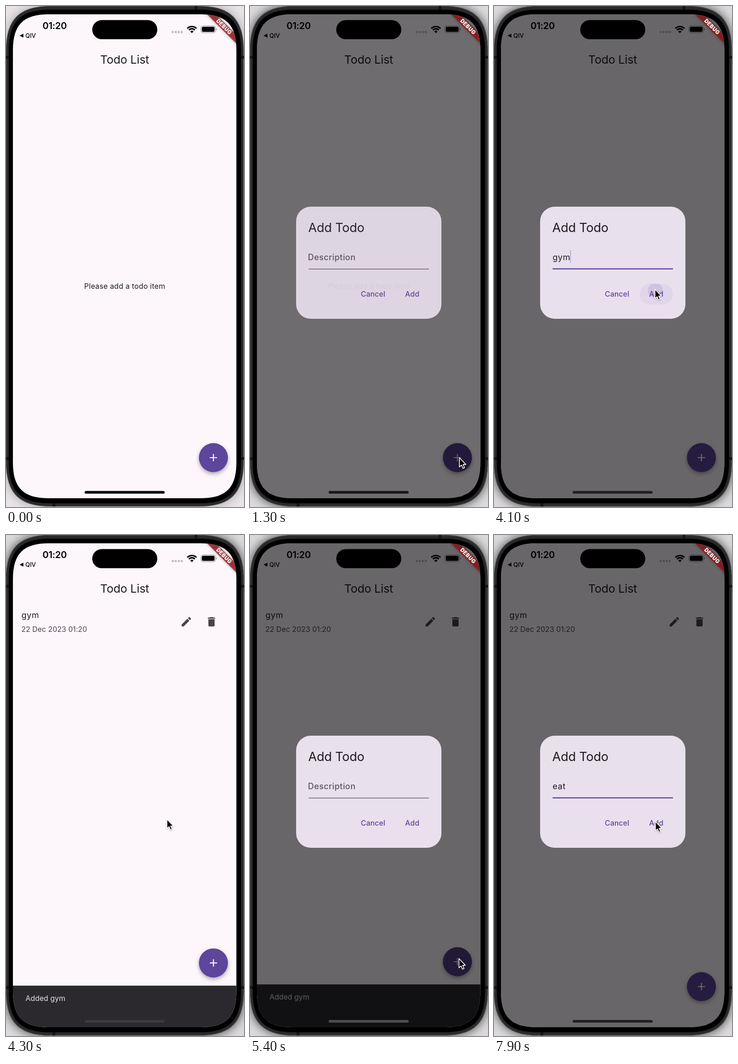
These frames come from a looping animation (516x1086 px, 8000 ms). An HTML page:

```html
<!DOCTYPE html>
<html lang="en">
<head>
<meta charset="utf-8">
<title>Todo List</title>
<style>
@property --drop { syntax: '<length>'; inherits: true; initial-value: 92px; }

html, body { margin: 0; width: 100%; height: 100%; overflow: hidden; background: #dcdadd; }
svg { display: block; width: 516px; height: 1086px; font-family: Inter, Roboto, sans-serif; }
text { white-space: pre; }

.title { font-size: 24.8px; letter-spacing: -.12px; fill: #1d1b20; }
.head { font-size: 27px; letter-spacing: -.22px; fill: #1d1b20; }
.large { font-size: 18px; letter-spacing: .56px; fill: #1d1b20; }
.medium { font-size: 15.76px; letter-spacing: .28px; fill: #1d1b20; }
.label { font-size: 15.76px; font-weight: 500; letter-spacing: .15px; fill: #5b4499; }
.tight { letter-spacing: .06px; }
.muted { fill: #49454f; }
.pale { fill: #e8e2ea; }
.mid { text-anchor: middle; }

/* one shared 8 s clock */
.a { animation: 8s linear infinite; }
.step { animation-timing-function: step-end; }

.desk { animation-name: desk; }
@keyframes desk { 0% { fill: #e8e4e8 } 12.5% { fill: #dcdadd } }
.shade { animation-name: shade; filter: drop-shadow(0 0 11px rgba(0, 0, 0, .75)); }
@keyframes shade { 0% { opacity: .4 } 12.5% { opacity: 1 } }

.empty { animation-name: empty; }
@keyframes empty { 0% { opacity: 1 } 51.75% { opacity: 0 } }
.item { animation-name: item; }
@keyframes item { 0% { opacity: 0 } 51.75% { opacity: 1 } }

.app { animation-name: drop; animation-timing-function: cubic-bezier(.4, 0, .2, 1); }
@keyframes drop {
  0%, 51.5% { --drop: 93px }
  54.375%, 68.75% { --drop: 0px }
  71.875%, 100% { --drop: 93px }
}
.snack { transform: translateY(var(--drop)); }
.fab { transform: translateY(min(0px, calc(var(--drop) - 54px))); }
.disc { filter: drop-shadow(0 4px 4px rgba(0, 0, 0, .32)); }

.press { animation-name: press; }
@keyframes press {
  0%, 11.9% { opacity: 0 } 13.75%, 18.75% { opacity: .13 } 22.5%, 61.9% { opacity: 0 }
  63.75%, 68.75% { opacity: .13 } 72.5%, 100% { opacity: 0 }
}

.modal { animation-name: modal; animation-timing-function: ease; }
.sheet { animation-timing-function: ease-out; }
@keyframes modal {
  0%, 14.375% { opacity: 0 } 16.875%, 51.625% { opacity: 1 }
  53.375%, 64.375% { opacity: 0 } 66.875%, 100% { opacity: 1 }
}

.hint { animation-name: hint; }
@keyframes hint { 0% { opacity: 1 } 37.5% { opacity: 0 } 53.75% { opacity: 1 } 83.75% { opacity: 0 } }
.focus { animation-name: focus; }
@keyframes focus {
  0%, 33.75% { opacity: 0 } 35%, 53.5% { opacity: 1 } 53.75%, 80% { opacity: 0 } 81.25%, 100% { opacity: 1 }
}

.k1 { animation-name: k1 } .k2 { animation-name: k2 } .k3 { animation-name: k3 }
.k4 { animation-name: k4 } .k5 { animation-name: k5 } .k6 { animation-name: k6 }
@keyframes k1 { 0% { fill-opacity: 0 } 37.5% { fill-opacity: 1 } 53.75% { fill-opacity: 0 } }
@keyframes k2 { 0% { fill-opacity: 0 } 40% { fill-opacity: 1 } 53.75% { fill-opacity: 0 } }
@keyframes k3 { 0% { fill-opacity: 0 } 41.25% { fill-opacity: 1 } 53.75% { fill-opacity: 0 } }
@keyframes k4 { 0% { fill-opacity: 0 } 83.75% { fill-opacity: 1 } }
@keyframes k5 { 0% { fill-opacity: 0 } 88.75% { fill-opacity: 1 } }
@keyframes k6 { 0% { fill-opacity: 0 } 90% { fill-opacity: 1 } }

.caret { animation-name: caret; }
@keyframes caret {
  0% { transform: none }
  37.5% { transform: translateX(11px) }
  40% { transform: translateX(21px) }
  41.25% { transform: translateX(38px) }
  53.75% { transform: none }
  83.75% { transform: translateX(10.8px) }
  88.75% { transform: translateX(21.4px) }
  90% { transform: translateX(29px) }
}
.blink { animation-name: blink; }
@keyframes blink {
  0%, 33.7% { opacity: 0 } 33.75%, 48.125% { opacity: 1 } 51.25% { opacity: .3 }
  53.5%, 79.95% { opacity: 0 } 80%, 95.625% { opacity: 1 } 98.125%, 100% { opacity: 0 }
}

.pill { animation-name: pill; }
@keyframes pill { 0%, 50.7% { opacity: 0 } 51.2%, 53.4% { opacity: 1 } 53.75%, 100% { opacity: 0 } }
.splash { animation-name: splash; }
@keyframes splash { 0%, 50.6% { r: 8px } 51.25% { r: 16px } 53.4%, 100% { r: 50px } }

.home { animation-name: home; }
@keyframes home {
  0%, 14.375% { fill: #000 } 16.875%, 51.625% { fill: #222023 }
  54%, 64.375% { fill: #403e43 } 66.875%, 69% { fill: #4e4c50 } 71.875%, 100% { fill: #222023 }
}

.show { animation-name: show; }
@keyframes show { 0% { opacity: 0 } 1.25% { opacity: 1 } }
.cursor {
  animation-name: move; animation-timing-function: ease-in-out;
  filter: drop-shadow(0 1.5px 1.2px rgba(0, 0, 0, .35));
}
@keyframes move {
  0%, 1.25% { transform: translate(117px, 640px) }
  6.25% { transform: translate(490px, 996px) }
  8.75%, 23.1% { transform: translate(454px, 979px) }
  30%, 43.1% { transform: translate(264px, 530px) }
  46.25% { transform: translate(346px, 648px) }
  48.75%, 51.25% { transform: translate(349px, 614px) }
  53.75%, 55% { transform: translate(349px, 616px) }
  58.75% { transform: translate(494px, 936px) }
  61.25%, 73.1% { transform: translate(453px, 918px) }
  77.5%, 90.6% { transform: translate(264px, 525px) }
  95.6% { transform: translate(372px, 686px) }
  98.75%, 100% { transform: translate(350px, 621px) }
}
</style>
</head>
<body>
<svg viewBox="0 0 516 1086">
  <defs>
    <clipPath id="screen"><path data-box="15 18 484.5 1049 62"/></clipPath>
    <clipPath id="button"><rect x="316" y="602" width="72" height="45" rx="22.5"/></clipPath>
  </defs>

  <!-- phone body -->
  <rect class="a step desk" width="516" height="1086"/>
  <path class="a step shade" data-box="0 0 515.5 1085 78"/>
  <path data-box="0 0 515.5 1085 78" fill="#454445"/>
  <path data-box="1.5 1.5 512.5 1082 76.5" fill="#2a292a"/>
  <path d="M409 0h6v8h-6zM101 1077h6v8h-6zM0 108h7v6H0zM0 978h7v6H0zM509 108h7v6h-7zM509 978h7v6h-7z" fill="#171617"/>
  <path data-box="6 8 503.5 1070 71"/>

  <g clip-path="url(#screen)">
    <g class="a app">
      <rect x="14" y="18" width="487" height="1050" fill="#fdf7fc"/>
      <text class="title mid" x="257.3" y="125.3">Todo List</text>
      <text class="a step empty medium mid" x="257.4" y="613">Please add a todo item</text>

      <g class="a step item">
        <text class="large" x="33.5" y="180">gym</text>
        <text class="medium muted tight" x="33.3" y="209.5">22 Dec 2023 01:20</text>
        <g fill="#47434a">
          <path transform="translate(377.5 174.5) scale(1.1256)" d="M3 17.25V21h3.75L17.81 9.94l-3.75-3.75L3 17.25zM20.71 7.04c.39-.39.39-1.02 0-1.41l-2.34-2.34c-.39-.39-1.02-.39-1.41 0l-1.83 1.83 3.75 3.75 1.83-1.83z"/>
          <path transform="translate(432 174.5) scale(1.1256)" d="M6 19c0 1.1.9 2 2 2h8c1.1 0 2-.9 2-2V7H6v12zM19 4h-3.5l-1-1h-5l-1 1H5v2h14V4z"/>
        </g>
      </g>

      <g class="snack">
        <rect x="14" y="974.2" width="487" height="94" fill="#2b292d"/>
        <text class="medium tight pale" x="42.3" y="1007">Added gym</text>
      </g>

      <g class="fab">
        <circle class="disc" cx="449.7" cy="979" r="31.5" fill="#5d469b"/>
        <path d="M441.8 979h15.8M449.7 971.1v15.8" stroke="#fff" stroke-width="2.2"/>
        <circle class="a press" cx="449.7" cy="979" r="31.5"/>
      </g>
    </g>

    <g class="a modal">
      <rect x="14" y="18" width="487" height="1050" fill-opacity=".587"/>
    </g>

    <g class="a modal sheet">
      <rect x="100" y="435" width="315" height="243" rx="31.5" fill="#e9e0ee"/>
      <text class="head" x="126.3" y="489.5">Add Todo</text>
      <text class="a step hint large" x="125.5" y="551.3" style="font-weight:500;letter-spacing:.42px;fill:#5a5560">Description</text>
      <text class="large" x="127" y="551.3"><tspan class="a step k1">g</tspan><tspan class="a step k2">y</tspan><tspan class="a step k3">m</tspan></text>
      <text class="large" x="127" y="551.3"><tspan class="a step k4">e</tspan><tspan class="a step k5">a</tspan><tspan class="a step k6">t</tspan></text>
      <g class="a step caret"><rect class="a blink" x="126.8" y="529" width="2.2" height="28.5" rx="1" fill="#5b4499"/></g>
      <rect x="127" y="569.6" width="261" height="1.2" fill="#49454f"/>
      <rect class="a focus" x="127" y="568.6" width="261" height="2.4" fill="#5b4499"/>

      <g class="a pill" clip-path="url(#button)">
        <rect x="316" y="602" width="72" height="45" fill="#e0d6ec"/>
        <circle class="a splash" cx="349.5" cy="617" r="16" fill="#cfc4df"/>
      </g>
      <text class="label mid" x="266.8" y="629.8">Cancel</text>
      <text class="label mid" x="351.8" y="629.8">Add</text>
    </g>

    <!-- debug ribbon -->
    <g transform="translate(472.4 45) rotate(45)">
      <rect x="-70" y="-6.75" width="140" height="13.5" fill="#911418" fill-opacity=".79" style="filter:drop-shadow(0 0 3px rgba(0,0,0,.4))"/>
      <text class="mid" x=".2" y="4.1" fill="#fff" font-size="11.4" font-weight="900" letter-spacing=".5">DEBUG</text>
    </g>
  </g>

  <!-- status bar -->
  <text class="mid" x="105.5" y="49.9" font-size="20" font-weight="600" letter-spacing="-.2">01:20</text>
  <path d="M29.5 64.3l8.2-4.2v8.4z"/>
  <text x="42" y="68.9" font-size="13" font-weight="500">QIV</text>
  <rect x="187" y="30.5" width="141" height="41.5" rx="20.7"/>
  <g fill-opacity=".25">
    <circle cx="361.5" cy="56.5" r="2.4"/><circle cx="368" cy="56.5" r="2.4"/>
    <circle cx="374.5" cy="56.5" r="2.4"/><circle cx="381" cy="56.5" r="2.4"/>
  </g>
  <path d="M393.1 48.6a14 14 0 0 1 19.8 0M396.6 52.1a9 9 0 0 1 12.8 0" fill="none" stroke="#000" stroke-width="3.2"/>
  <path d="M403 58.8l-3.7-3.7a5.2 5.2 0 0 1 7.4 0z"/>
  <rect x="422.6" y="43.1" width="31.6" height="14.8" rx="4.6" fill="none" stroke="#000" stroke-opacity=".4" stroke-width="1.2"/>
  <rect x="424.6" y="45" width="27.6" height="11" rx="2.9"/>
  <path d="M455.6 48v5a2.8 2.8 0 0 0 0-5z" fill-opacity=".45"/>
  <rect class="a home" x="170.5" y="1051.3" width="173.5" height="5.8" rx="2.9"/>

  <g class="a step show">
    <g class="a cursor">
      <path transform="scale(1.15)" d="M0 0v17.6l4-3.7 2.6 6.3 3-1.3-2.6-6h5.2z" fill="#000" stroke="#fff" stroke-width="1.4" stroke-linejoin="round"/>
    </g>
  </g>
</svg>
<script>
// Rounded box whose corners ease into the straight sides
function smoothBox(x, y, w, h, r) {
  const R = x + w, B = y + h, e = 1.25 * r, c = .364 * r;
  return `M${x} ${y + e}C${x} ${y + c} ${x + c} ${y} ${x + e} ${y}H${R - e}` +
    `C${R - c} ${y} ${R} ${y + c} ${R} ${y + e}V${B - e}` +
    `C${R} ${B - c} ${R - c} ${B} ${R - e} ${B}H${x + e}` +
    `C${x + c} ${B} ${x} ${B - c} ${x} ${B - e}Z`;
}
for (const p of document.querySelectorAll('[data-box]')) {
  p.setAttribute('d', smoothBox(...p.dataset.box.split(' ').map(Number)));
}
</script>
</body>
</html>
```
